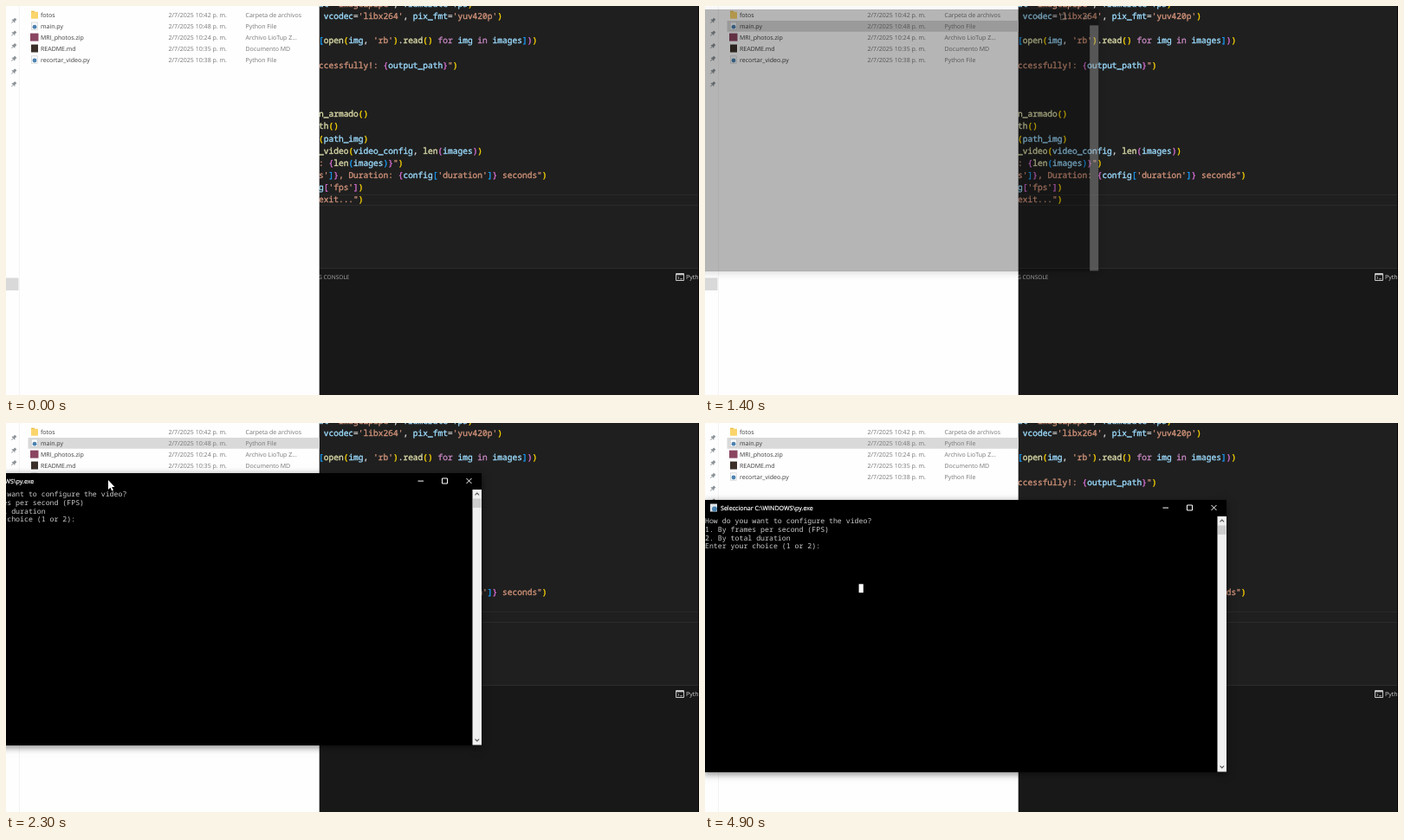
Recreate the animation shown at these times as an HTML page with a canvas. Size 800 by 450 pixels, loop 5000 ms.

```html
<!DOCTYPE html>
<html lang="en">
<head>
<meta charset="utf-8">
<title>Desktop session</title>
<style>
  html, body { margin: 0; width: 100%; height: 100%; overflow: hidden; background: #181818; }
  canvas { display: block; width: 800px; height: 450px; }
</style>
</head>
<body>
<canvas id="stage" width="800" height="450"></canvas>
<script>
const ctx = document.getElementById('stage').getContext('2d');
const LOOP = 5000, STEP = 100;
const UI = '"Open Sans", "Noto Sans", sans-serif';
const MONO = '"Noto Sans Mono", "DejaVu Sans Mono", monospace';

const CODE = { x: 361, y: 0.6, col: 5.73, row: 14.18 };
const INK = {
  v: '#9cdcfe', s: '#ce9178', f: '#dcdcaa', k: '#c586c0', o: '#d4d4d4',
  1: '#ffd700', 2: '#da70d6', 3: '#179fff'
};

// Each code line: row number, then pairs of ink and text.
const codeLines = [
  [0, 'v', 'at', 'o', '=', 's', "'image2pipe'", 'o', ', ', 'v', 'framerate', 'o', '=', 'v', 'fps', 1, ')'],
  [1, 'v', ' vcodec', 'o', '=', 's', "'libx264'", 'o', ', ', 'v', 'pix_fmt', 'o', '=', 's', "'yuv420p'", 1, ')'],
  [3, 3, '[', 'f', 'open', 1, '(', 'v', 'img', 'o', ', ', 's', "'rb'", 1, ')', 'o', '.', 'f', 'read', 1, '()',
    'k', ' for ', 'v', 'img', 'k', ' in ', 'v', 'images', 3, ']', 2, ')', 1, ')'],
  [5, 's', 'ccessfully!: ', 2, '{', 'v', 'output_path', 2, '}', 's', '"', 1, ')'],
  [9, 'f', 'n_armado', 1, '()'],
  [10, 'f', 'th', 1, '()'],
  [11, 1, '(', 'v', 'path_img', 1, ')'],
  [12, 'f', '_video', 1, '(', 'v', 'video_config', 'o', ', ', 'f', 'len', 2, '(', 'v', 'images', 2, ')', 1, ')'],
  [13, 's', ': ', 2, '{', 'f', 'len', 3, '(', 'v', 'images', 3, ')', 2, '}', 's', '"', 1, ')'],
  [14, 's', "s'", 3, ']', 2, '}', 's', ', Duration: ', 2, '{', 'v', 'config', 3, '[', 's', "'duration'",
    3, ']', 2, '}', 's', ' seconds"', 1, ')'],
  [15, 'v', 'g', 2, '[', 's', "'fps'", 2, ']', 1, ')'],
  [16, 's', 'exit..."', 1, ')']
];

const files = [
  ['fotos', '10:42', 'Carpeta de archivos', folderIcon],
  ['main.py', '10:48', 'Python File', scriptIcon],
  ['MRI_photos.zip', '10:24', 'Archivo LioTup Z...', y => rect(28, y - 4.5, 9.5, 9, '#8a4560')],
  ['README.md', '10:35', 'Documento MD', y => rect(29, y - 4.5, 8, 9, '#3a3029')],
  ['recortar_video.py', '10:38', 'Python File', scriptIcon]
];

const prompt = [
  'How do you want to configure the video?',
  '1. By frames per second (FPS)',
  '2. By total duration',
  'Enter your choice (1 or 2):'
];

function rect(x, y, w, h, color) {
  ctx.fillStyle = color;
  ctx.fillRect(x, y, w, h);
}

// `bolden` thickens the glyphs by a thin outline.
function text(str, x, y, size, color, family = UI, bolden = 0) {
  ctx.font = `${size}px ${family}`;
  ctx.fillStyle = ctx.strokeStyle = color;
  ctx.fillText(str, x, y);
  if (bolden) {
    ctx.lineWidth = bolden;
    ctx.strokeText(str, x, y);
  }
}

function dot(x, y, r, color) {
  ctx.fillStyle = color;
  ctx.beginPath();
  ctx.arc(x, y, r, 0, 7);
  ctx.fill();
}

function shape(points, color, closed = true, width = 0) {
  ctx.beginPath();
  points.forEach(([x, y], i) => i ? ctx.lineTo(x, y) : ctx.moveTo(x, y));
  if (closed) ctx.closePath();
  if (width) {
    ctx.lineWidth = width;
    ctx.strokeStyle = color;
    ctx.stroke();
  } else {
    ctx.fillStyle = color;
    ctx.fill();
  }
}

function folderIcon(y) {
  rect(29, y - 4.5, 4, 2, '#e8b63f');
  rect(29, y - 3.5, 8, 8, '#fbd56b');
}

function scriptIcon(y) {
  rect(29, y - 4.5, 7.5, 9, '#c4c8cc');
  rect(29.6, y - 3.9, 6.3, 7.8, '#f8f9fa');
  dot(33, y + 1, 2.4, '#4b82b0');
}

function pin(y) {
  ctx.save();
  ctx.translate(9, y);
  ctx.rotate(Math.PI / 4);
  rect(-1.5, -3.2, 3, 3.6, '#8b9298');
  rect(-2.4, 0, 4.8, 1, '#8b9298');
  rect(-0.35, 1, 0.7, 2.8, '#8b9298');
  ctx.restore();
}

function drawEditor() {
  rect(361, 0, 439, 303, '#1f1f1f');
  rect(361, 303, 439, 147, '#181818');
  rect(361, 303, 439, 1, '#2b2b2b');
  rect(361, 218, 438, 1, '#2a2a2a');
  rect(361, 230, 438, 1, '#2a2a2a');
  for (const [row, ...tokens] of codeLines) {
    let col = 0;
    for (let i = 0; i < tokens.length; i += 2) {
      text(tokens[i + 1], CODE.x + col * CODE.col, CODE.y + row * CODE.row,
        CODE.col / 0.6, INK[tokens[i]], MONO, 0.35);
      col += tokens[i + 1].length;
    }
  }
  ctx.textAlign = 'right';
  text('DEBUG CONSOLE', 396.5, 316.3, 6.6, '#a8a8a8');
  ctx.textAlign = 'left';
  ctx.strokeStyle = '#c8c8c8';
  ctx.lineWidth = 1;
  ctx.strokeRect(773.5, 309.5, 9, 8);
  rect(773.5, 310, 9, 1.3, '#c8c8c8');
  shape([[775.3, 313], [777, 314.5], [775.3, 316]], '#c8c8c8', false, 0.8);
  rect(778, 315.4, 3, 0.8, '#c8c8c8');
  text('Python', 785, 316.2, 7, '#d0d0d0');
  rect(799, 0, 1, 450, '#080808');
}

function drawExplorer(rowColor) {
  rect(0, 0, 361.7, 450, '#fefefe');
  rect(15, 0, 1, 450, '#f3f3f3');
  rect(0, 314.5, 14.5, 14.5, '#d9d9d9');
  for (let i = 0; i < 6; i++) pin(17 + i * 14.7);
  if (rowColor) rect(25.5, 17, 336.2, 12.7, rowColor);
  files.forEach(([name, time, kind, icon], i) => {
    const y = 10.2 + i * 12.95, base = y + 2.5;
    icon(y);
    text(name, 40, base, 7, '#3c3c3c');
    text(`2/7/2025 ${time} p. m.`, 187.5, base, 7.05, '#777');
    text(kind, 276.5, base, 7, '#777');
  });
}

// The shadow is kept outside the frame so that it does not darken a translucent window.
function drawShadow(x, y, w, h) {
  ctx.save();
  ctx.beginPath();
  ctx.rect(x - 40, y - 40, w + 80, h + 80);
  ctx.rect(x, y, w, h);
  ctx.clip('evenodd');
  ctx.shadowColor = 'rgba(0,0,0,.5)';
  ctx.shadowBlur = 8;
  ctx.shadowOffsetY = 2;
  rect(x, y, w, h, '#000');
  ctx.restore();
}

// Window coordinates are those of its final resting place.
function drawConsole({ dx, dy, scale = 1, alpha = 1, ready = true, selecting = false }) {
  ctx.save();
  ctx.globalAlpha = alpha;
  ctx.translate(dx + 300.5, dy + 246.5);
  ctx.scale(scale, scale);
  ctx.translate(-300.5, -246.5);

  drawShadow(-1, 89, 603, 315);
  rect(-1, 89, 603, 315, '#000');

  rect(591.5, 108, 10.5, 295.5, '#f0f0f0');
  if (ready) rect(592, 118.5, 9.5, 10.5, '#cdcdcd');
  shape([[594.5, 114.3], [596.8, 112], [599.1, 114.3]], '#555', false, 1.1);
  shape([[594.5, 396.7], [596.8, 399], [599.1, 396.7]], '#555', false, 1.1);

  rect(528.5, 97.6, 6.5, 1, '#fff');
  ctx.strokeStyle = '#fff';
  ctx.lineWidth = 1;
  ctx.strokeRect(556.5, 95, 6, 6);
  shape([[584.5, 95], [590.5, 101]], '#fff', false, 1);
  shape([[590.5, 95], [584.5, 101]], '#fff', false, 1);

  if (ready) {
    rect(6, 93.5, 8, 9, '#dfe4e8');
    dot(11, 99.5, 3, '#4b82b0');
    text((selecting ? 'Seleccionar ' : '') + 'C:\\WINDOWS\\py.exe', 18, 100.7, 7.1, '#fff', UI, 0.2);
    prompt.forEach((line, i) => text(line, 0, 116 + i * 9.8, 8.23, '#cccccc', MONO));
  }
  if (selecting) rect(177.6, 186.3, 5.2, 10, '#fff');
  ctx.restore();
}

function drawPointer(x, y) {
  const arrow = [[0, 0], [0, 11], [2.5, 8.7], [4.2, 12.5], [5.9, 11.8], [4.2, 8], [7.5, 8]]
    .map(([px, py]) => [x + px, y + py]);
  shape(arrow, '#000', true, 1);
  shape(arrow, '#fff');
}

// Piecewise linear track through [time, x, y] keys.
function track(keys, t) {
  if (t <= keys[0][0]) return keys[0].slice(1);
  for (let i = 1; i < keys.length; i++) {
    const [t0, x0, y0] = keys[i - 1], [t1, x1, y1] = keys[i];
    if (t < t1) {
      const p = (t - t0) / (t1 - t0);
      return [x0 + (x1 - x0) * p, y0 + (y1 - y0) * p];
    }
  }
  return keys[keys.length - 1].slice(1);
}

const dragPath = [[2200, -136, -91], [2300, -53, -31], [2500, 4, -6], [2600, 10, 1], [2800, 0, 0]];
const approach = [[2000, 62, 18], [2100, 35, 6]];
const toClick = [[2800, 171, 97], [3200, 180, 190]];

function consoleState(t) {
  const [dx, dy] = track(dragPath, t);
  if (t < 1400) return { dx, dy, scale: 0.93, alpha: 0.08, ready: false };
  if (t < 1500) return { dx, dy, scale: 0.961, alpha: 0.29, ready: false };
  if (t < 1600) return { dx, dy, scale: 0.992, alpha: 0.85, ready: false };
  return { dx, dy, selecting: t >= 3300 };
}

function render(time) {
  const t = Math.floor((time % LOOP) / STEP) * STEP;
  ctx.textRendering = 'geometricPrecision';
  ctx.lineJoin = 'round';
  drawEditor();
  drawExplorer(t >= 1200 ? '#d9d9d9' : t >= 700 ? '#e5f3ff' : null);
  if (t >= 1300) {
    const state = consoleState(t);
    drawConsole(state);
    if (t >= 2000 && t < 3300) {
      const [x, y] = t < 2300 ? track(approach, t)
        : t < 2800 ? [state.dx + 171, state.dy + 97]
        : track(toClick, t);
      drawPointer(x, y);
    }
  }
}

const start = performance.now();
function tick() {
  render(performance.now() - start);
  requestAnimationFrame(tick);
}
tick();
</script>
</body>
</html>
```
